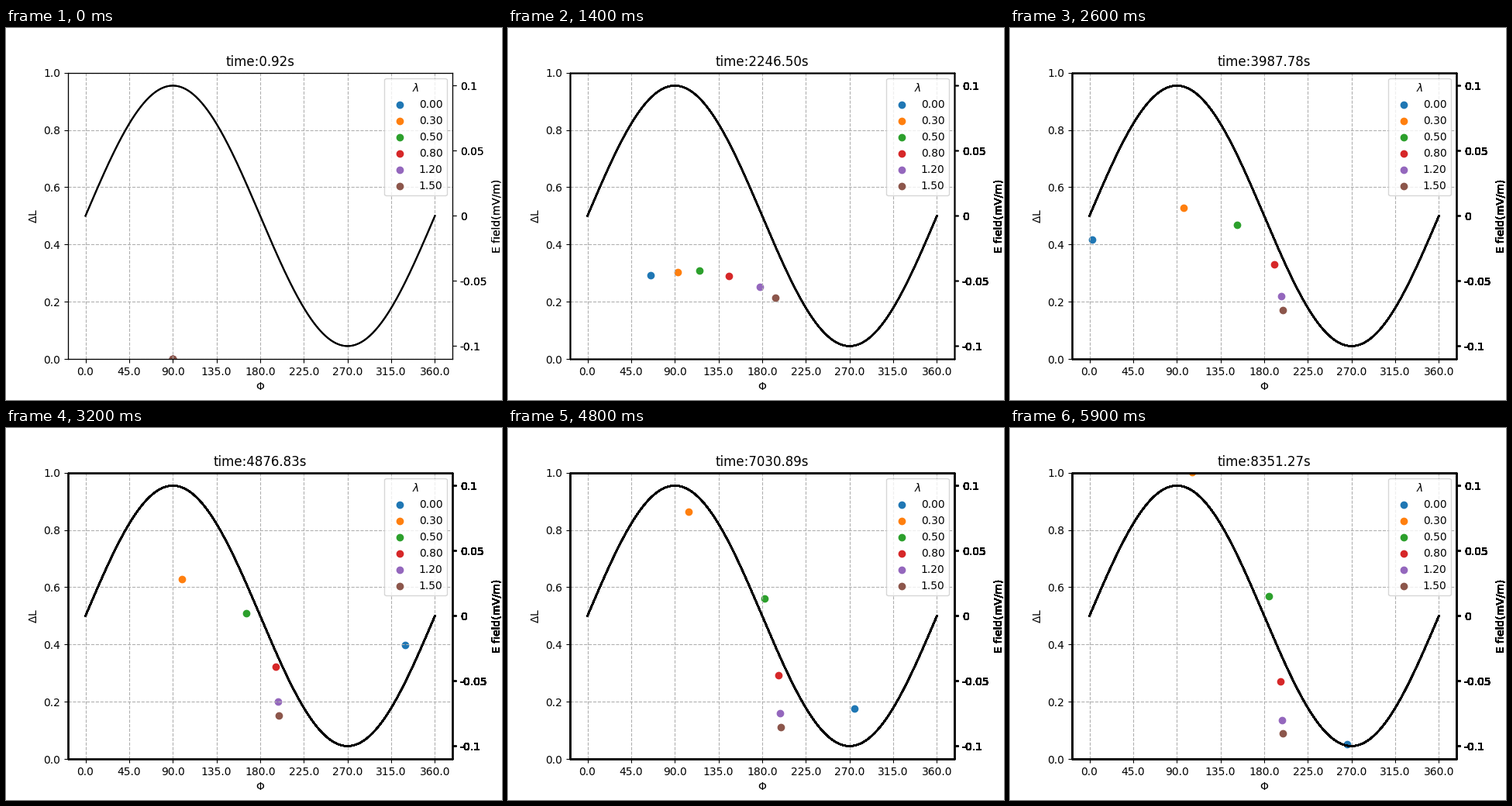
Animation of 640 by 480 pixels, one loop 6 s. Source, as a matplotlib script:

```python
import numpy as np
import matplotlib.pyplot as plt
from matplotlib.animation import FuncAnimation

FRAMES = 60
N = np.arange(FRAMES)

# simulation clock: key frames and seconds, linear in between
CLOCK = np.interp(N, [0, 6, 14, 26, 39, 48, 59],
                  [0.92, 963.23, 2246.50, 3987.78, 5914.05, 7030.89, 8351.27])


def fade(scale, power=1):
    """Decay from 1 towards 0."""
    return np.exp(-(N / scale) ** power)


def ramp(size, scale, power=1):
    """Rise from 0 that levels off at size."""
    return size * (1 - fade(scale, power))


# label: (azimuth drift away from 90 degrees, shift in L)
TRACKS = {
    "0.00": (ramp(-187, 31.5, 2.4), 0.0222 * N * fade(38.9, 2.8)),
    "0.30": (ramp(18, 38.5, 1.7), ramp(2, 85)),
    "0.50": (ramp(95, 25.3, 2), ramp(0.575, 17.2, 1.25)),
    "0.80": (ramp(107, 16.2, 2.15), ramp(0.403, 10.3, 1.46) * fade(150)),
    "1.20": (ramp(108, 11.25, 2.3), ramp(0.318, 7.1, 1.8) * fade(70)),
    "1.50": (ramp(109, 9.1, 2.5), ramp(0.288, 6.3, 1.9) * fade(50)),
}


def field_ink(host):
    """Ink coverage of one field axes (black on white), drawn on its own."""
    field = host.twinx()
    deg = np.linspace(0, 360, 361)
    field.plot(deg, 0.1 * np.sin(np.radians(deg)), color="black")
    field.set_ylim(-0.11, 0.11)
    ticks = np.linspace(-0.1, 0.1, 5)
    field.set_yticks(ticks, [f"{t:g}" for t in ticks])
    field.set_ylabel("E field(mV/m)")
    host.set_visible(False)
    fig.canvas.draw()
    shot = np.asarray(fig.canvas.buffer_rgba())[..., 0]
    ink = 1 - shot / 255.0
    field.set_visible(False)
    host.set_visible(True)
    return ink


fig, ax = plt.subplots(figsize=(6.4, 4.8), dpi=100)
ax.set_xlim(-18, 378)
ax.set_ylim(0, 1)
ink = field_ink(ax)

angles = np.arange(0, 361, 45.0)
ax.set_xticks(angles, [f"{a:.1f}" for a in angles])
ax.set_xlabel("Φ")
ax.set_ylabel(r"$\Delta$L")
ax.grid(linestyle="--")
title = ax.set_title("")

dots, paths = [], []
for label, (drift, shift) in TRACKS.items():
    dots.append(ax.scatter([90], [0], label=label))
    paths.append(np.column_stack([(90 + drift) % 360, shift]))
ax.legend(title=r"$\lambda$", loc="upper right")

layer = np.zeros(ink.shape + (4,), np.uint8)
overlay = fig.figimage(layer, origin="upper", zorder=5)


def update(n):
    title.set_text(f"time:{CLOCK[n]:.2f}s")
    for dot, path in zip(dots, paths):
        dot.set_offsets(path[n:n + 1])
    # the field axes is stacked once more each frame, so soft edges darken
    layer[..., 3] = np.round(255 * (1 - (1 - ink) ** (n + 2)))
    overlay.set_data(layer.copy())
    return [title, overlay, *dots]


anim = FuncAnimation(fig, update, frames=FRAMES, interval=100,
                     init_func=lambda: update(0), repeat=True,
                     repeat_delay=0, blit=False)
plt.show()
```
